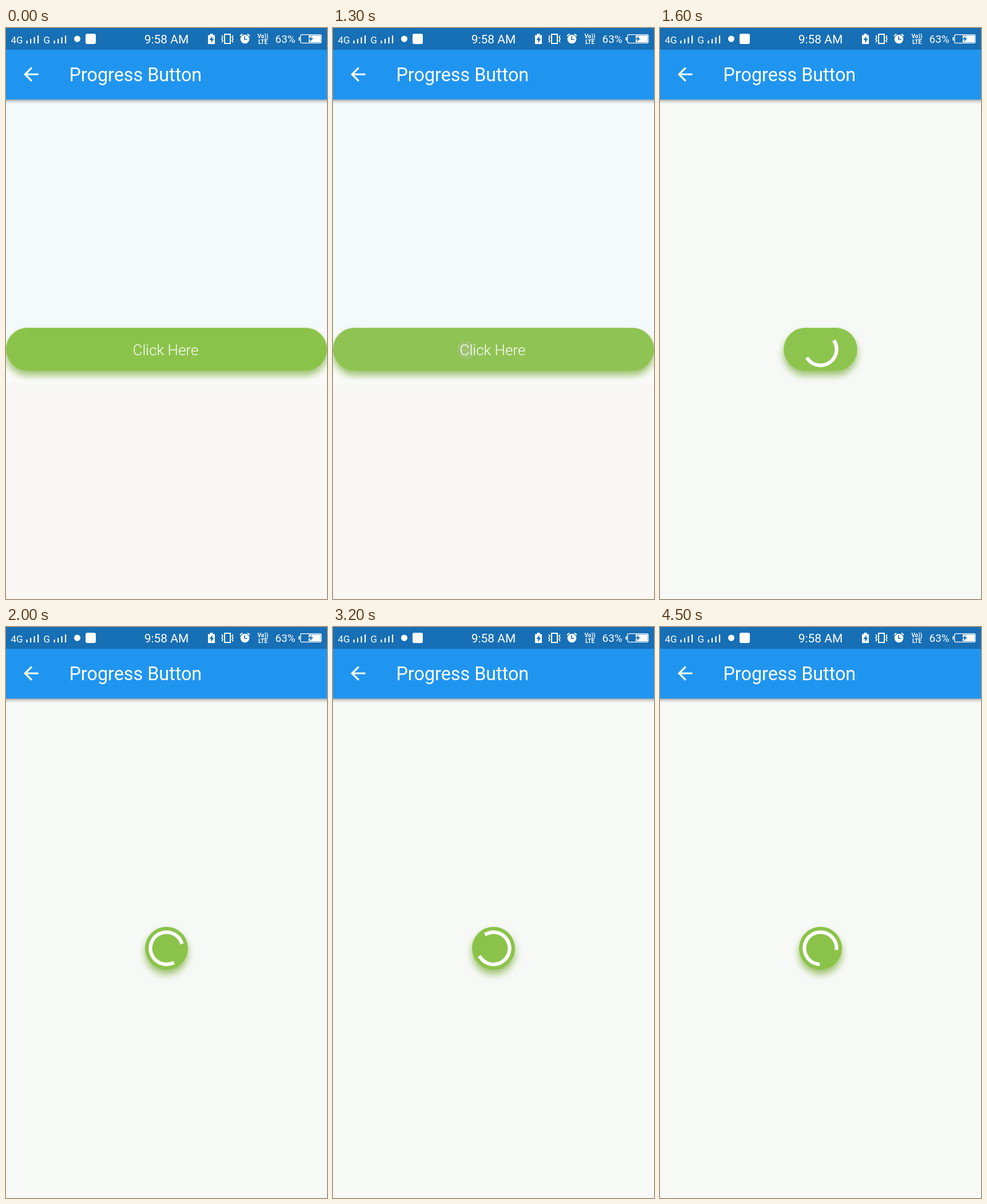
Animation, 561 px wide and 998 px high, one loop 4.6 s. Source, as an HTML page:

```html
<!DOCTYPE html>
<html lang="en">
<head>
<meta charset="utf-8">
<title>Progress Button</title>
<style>
  html, body { margin: 0; width: 100%; height: 100%; overflow: hidden; background: #f7f9f7; }
  svg { display: block; width: 561px; height: 998px; font-family: Roboto, sans-serif; }
  text { fill: #fff; }
  #bar { filter: drop-shadow(0 2.5px 3px rgba(0, 0, 0, .42)); }
  #button { filter: drop-shadow(0 8px 6.5px rgba(112, 165, 42, .68)); }
</style>
</head>
<body>
<svg viewBox="0 0 561 998">
  <defs>
    <clipPath id="pill"><rect class="shape" y="524" height="75" rx="37.5"/></clipPath>
    <linearGradient id="tint" x1="0" y1="0" x2="0" y2="1">
      <stop offset="0" stop-color="#f4f9fc"/>
      <stop offset=".52" stop-color="#f4f9fc"/>
      <stop offset=".54" stop-color="#fafbfb"/>
      <stop offset=".62" stop-color="#fafbf9"/>
      <stop offset=".63" stop-color="#f8f7f4"/>
      <stop offset="1" stop-color="#f8f7f4"/>
    </linearGradient>
    <g id="signal" fill="#fff">
      <rect y="22" width="2.2" height="5"/>
      <rect x="6.5" y="19" width="2.2" height="8"/>
      <rect x="13" y="16" width="2.2" height="11"/>
      <rect x="19.5" y="13" width="2.2" height="14"/>
    </g>
  </defs>

  <rect width="561" height="998" fill="#f7f9f7"/>
  <rect id="idle" width="561" height="998" fill="url(#tint)"/>

  <!-- App bar -->
  <rect id="bar" x="-10" y="-10" width="581" height="135" fill="#2095f0"/>
  <rect width="561" height="38" fill="#176fb5"/>
  <path fill="#fff" transform="translate(24.6 61.8) scale(1.6)"
    d="M20 11H7.83l5.59-5.59L12 4l-8 8 8 8 1.41-1.41L7.83 13H20z"/>
  <text x="110.5" y="93" font-size="32.3">Progress Button</text>

  <!-- Status bar -->
  <text x="8.5" y="27" font-size="17">4G</text>
  <use href="#signal" x="35.5"/>
  <text x="65.5" y="27" font-size="17">G</text>
  <use href="#signal" x="83.5"/>
  <circle cx="124.5" cy="19" r="5.5" fill="#fff"/>
  <rect x="139" y="10" width="18" height="18" rx="3" fill="#fff"/>
  <text x="280.5" y="26.5" font-size="21" text-anchor="middle">9:58 AM</text>
  <path fill="#fff" d="M353 12.5h3.5V10h5v2.5h3.5V28h-12z"/>
  <path fill="#176fb5" d="M360.5 14l-5 7h3v5l5-7h-3z"/>
  <g fill="none" stroke="#fff" stroke-width="2">
    <rect x="382" y="11" width="10" height="16"/>
    <path stroke-width="1.6" d="M377 13l2 3-2 3 2 3-2 3M397 13l-2 3 2 3-2 3 2 3"/>
    <path d="M409 14l4-3.5M426 14l-4-3.5"/>
  </g>
  <circle cx="417.5" cy="19.5" r="7.8" fill="#fff"/>
  <path fill="none" stroke="#176fb5" stroke-width="1.7" d="M417 14.5v5.5h4.5"/>
  <g font-size="10" font-weight="700" text-anchor="middle">
    <text x="449" y="18">Vo))</text>
    <text x="449" y="27.5">LTE</text>
  </g>
  <text x="470.5" y="26" font-size="19">63%</text>
  <rect x="514.7" y="11.7" width="36.3" height="14.6" rx="2.5" fill="none" stroke="#fff" stroke-width="1.3"/>
  <rect x="511.5" y="16" width="2" height="6" fill="#fff"/>
  <rect x="529" y="13" width="20.8" height="12" fill="#fff"/>
  <path fill="#176fb5" d="M535 13l-6.5 7h4l-2 5 6.5-7h-4z"/>

  <!-- Button -->
  <g id="button"><rect class="shape" y="524" height="75" rx="37.5" fill="#8bc34a"/></g>
  <g clip-path="url(#pill)" fill="#c2c2c2">
    <rect id="highlight" y="524" width="561" height="75"/>
    <circle id="ripple" cx="233" cy="563"/>
  </g>
  <text id="label" x="279" y="571.5" font-size="26" font-weight="300" text-anchor="middle">Click Here</text>
  <path id="spinner" fill="none" stroke="#fff" stroke-width="6.25" stroke-linecap="square"/>
</svg>
<script>
  const LOOP = 4600, STEP = 100;
  const PRESS = 1300, SHRINK = 1333, SHRINK_TIME = 300;
  const FULL = 561, ROUND = 75;
  const CENTER = { x: 280.5, y: 561.5 }, RADIUS = 28.1;
  // [ms, spinner turns]
  const TURNS = [[1333, 0], [1500, .126], [2000, .516], [3200, 1.386], [4000, 2.011], [4500, 2.383], [4600, 2.458]];

  const $ = id => document.getElementById(id);
  const shapes = document.querySelectorAll('.shape');
  const clamp = v => Math.min(1, Math.max(0, v));

  function set(el, attrs) {
    for (const name in attrs) el.setAttribute(name, attrs[name]);
  }

  function turnsAt(t) {
    const i = Math.max(1, TURNS.findIndex(([time]) => t <= time));
    const [t0, a] = TURNS[i - 1], [t1, b] = TURNS[i];
    return a + (b - a) * (t - t0) / (t1 - t0);
  }

  // cubic-bezier(.4, 0, .2, 1), solved by bisection
  function ease(x) {
    x = clamp(x);
    if (x === 0 || x === 1) return x;
    let lo = 0, hi = 1, s = .5;
    for (let i = 0; i < 24; i++) {
      s = (lo + hi) / 2;
      const bx = 1.2 * s * (1 - s) ** 2 + .6 * s * s * (1 - s) + s ** 3;
      if (bx < x) lo = s; else hi = s;
    }
    return 3 * s * s * (1 - s) + s ** 3;
  }

  function arc(turns) {
    const step = Math.floor(turns), u = turns - step;
    const head = ease(u * 2), tail = ease(u * 2 - 1);
    const start = Math.PI * (-.5 + 1.5 * tail + 1.7 * u - .8 * step);
    const sweep = Math.max(1.5 * Math.PI * (head - tail), .01);
    const point = a => `${CENTER.x + RADIUS * Math.cos(a)} ${CENTER.y + RADIUS * Math.sin(a)}`;
    return `M${point(start)}A${RADIUS} ${RADIUS} 0 ${+(sweep > Math.PI)} 1 ${point(start + sweep)}`;
  }

  function draw(t) {
    const loading = t >= SHRINK;
    const width = FULL - (FULL - ROUND) * clamp((t - SHRINK) / SHRINK_TIME);
    shapes.forEach(el => set(el, { x: CENTER.x - width / 2, width }));

    const sincePress = t - PRESS, pressed = sincePress >= 0;
    set($('highlight'), { opacity: pressed ? .07 * clamp(1 - sincePress / 500) : 0 });
    set($('ripple'), {
      r: 16 + Math.max(0, sincePress) * .25,
      opacity: pressed ? .25 * clamp(1 - sincePress / 200) : 0
    });

    set($('idle'), { opacity: loading ? 0 : 1 });
    set($('label'), { opacity: loading ? 0 : 1 });
    set($('spinner'), { d: loading ? arc(turnsAt(t)) : '' });
  }

  function tick() {
    const t = performance.now() % LOOP;
    draw(Math.floor(t / STEP) * STEP);
    requestAnimationFrame(tick);
  }
  tick();
</script>
</body>
</html>
```
